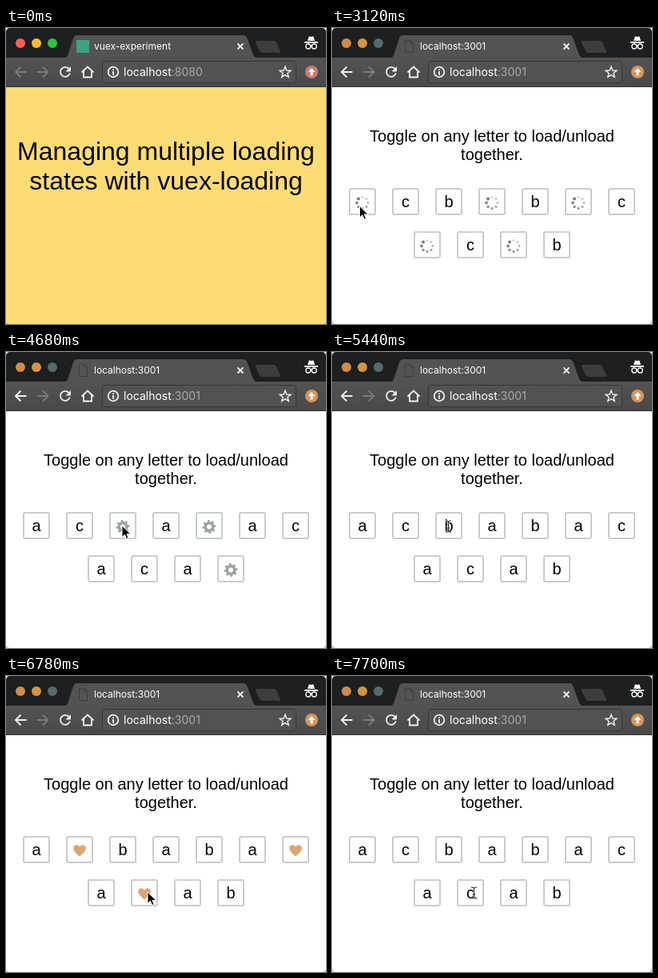
Write an HTML page that moves like this. It is 400x370 px and loops after 8.56 s.

```html
<!DOCTYPE html>
<html lang="en">
<head>
<meta charset="utf-8">
<title>Loading states</title>
<style>
html, body { margin: 0; width: 100%; height: 100%; overflow: hidden; background: #fff; }
svg { display: block; width: 100%; height: 100%; }
text { white-space: pre; }
.ui { font-family: Inter, Roboto, sans-serif; fill: #fff; }
.page { font-family: "Liberation Sans", Arial, sans-serif; fill: #000; text-anchor: middle; }
.line { fill: none; stroke: #f0f0f0; stroke-width: 1.8; }
</style>
</head>
<body>
<svg viewBox="0 0 400 370">
  <defs>
    <clipPath id="frame"><rect width="400" height="370" rx="5"/></clipPath>
    <linearGradient id="bar" x2="0" y2="1">
      <stop stop-color="#535353"/><stop offset="1" stop-color="#494949"/>
    </linearGradient>
  </defs>
  <rect y="360" width="400" height="10" fill="#c4c4c4"/>
  <g clip-path="url(#frame)">
    <rect id="paper" width="400" height="370"/>
    <rect width="400" height="38" fill="#1d1f20"/>
    <rect y="37" width="400" height="36" fill="url(#bar)"/>
    <rect y="73" width="400" height="1" fill="#333"/>
    <path d="M72 37.5C77 37 77 34 78.500 30L84 13Q85.500 9 89 9H296Q300 9 301.500 13L308 31Q310 37 314 37.500Z" fill="#535353"/>
    <path d="M313 16H334Q337 16 338 18L343 29Q344 31 341 31H321Q318 31 317 29L312 18Q311.500 16 313 16Z" fill="#3d3d3d"/>
    <g id="lights"></g>

    <rect id="favicon" x="88" y="15" width="16" height="16" fill="#3f9f83"/>
    <path id="doc" d="M91.500 15.500H98L101.500 19V30.500H91.500ZM98 15.500V19H101.500" fill="none" stroke="#3c3c3c"/>
    <text id="tab" class="ui" x="110" y="27" font-size="12"></text>
    <path class="line" d="M289.500 19.500L296.500 26.500M296.500 19.500L289.500 26.500" stroke-width="1.5"/>

    <g fill="#fff">
      <path d="M377 16L378.500 11Q379 10 381.500 11Q384 10 384.500 11L386 16Z"/>
      <rect x="373" y="17" width="17" height="1.800"/>
      <path d="M374.800 23a3 3 0 1 0 6 0a3 3 0 1 0 -6 0M382.200 23a3 3 0 1 0 6 0a3 3 0 1 0 -6 0M380.500 22.500Q381.500 21.500 382.500 22.500" fill="none" stroke="#fff" stroke-width="1.300"/>
    </g>

    <path id="back" class="line" d="M25.500 55H12M18.500 48.500L12 55L18.500 61.500"/>
    <path class="line" d="M39 55H52.500M46 48.500L52.500 55L46 61.500" style="stroke:#7b7b7b"/>
    <path class="line" d="M78.600 51A6 6 0 1 0 79.800 56.500"/>
    <path d="M81 48V54.500H74.500Z" fill="#f0f0f0"/>
    <path class="line" d="M94.500 55.500L102 48.500L109.500 55.500M97 54V61.500H107V54"/>
    <rect x="120.500" y="41.500" width="242" height="27" rx="3" fill="#525252" stroke="#363636"/>
    <circle class="line" cx="134" cy="55" r="6.300" stroke-width="1.500"/>
    <path d="M133.200 51.200h1.700v1.700h-1.700zM133.200 54h1.700v4.700h-1.700z" fill="#fff"/>
    <text class="ui" x="147" y="60" font-size="14">localhost<tspan id="port" fill="#a9a9a9"></tspan></text>
    <path id="star" class="line" style="stroke-width:1.4"/>
    <circle id="badge" cx="382" cy="55" r="8"/>
    <path d="M382 50L386.500 55H383.500V59.500H380.500V55H377.500Z" fill="#fff"/>

    <g id="intro" class="page" font-size="32">
      <text x="200" y="164.500">Managing multiple loading</text>
      <text x="200" y="201.500">states with vuex-loading</text>
    </g>
    <g id="demo" class="page" font-size="20">
      <text x="200" y="142">Toggle on any letter to load/unload</text>
      <text x="200" y="165">together.</text>
      <g id="keys"></g>
      <path id="arrow" d="M0 0V14.500L3.400 11.300L5.700 16.500L8.100 15.400L5.900 10.400H10.700Z" fill="#000" stroke="#fff" stroke-width="1"/>
      <g id="beam" fill="none">
        <path d="M-3.500 -7Q0 -7 0 -5Q0 -7 3.500 -7M0 -5V5M-3.500 7Q0 7 0 5Q0 7 3.500 7M-2 2H2" stroke="#fff" stroke-width="2.600" opacity=".7"/>
        <path d="M-3.500 -7Q0 -7 0 -5Q0 -7 3.500 -7M0 -5V5M-3.500 7Q0 7 0 5Q0 7 3.500 7M-2 2H2" stroke="#222" stroke-width="1.100"/>
      </g>
    </g>
  </g>
</svg>
<script>
const LOOP = 8560, START = 1960, TAU = Math.PI * 2;
const $ = id => document.getElementById(id);
const make = (tag, attrs, parent) => {
  const el = document.createElementNS('http://www.w3.org/2000/svg', tag);
  set(el, attrs);
  parent.append(el);
  return el;
};
function set(el, attrs) {
  for (const k in attrs) el.setAttribute(k, attrs[k]);
}
const show = (el, on) => { el.style.display = on ? '' : 'none'; };
const polar = (r, a) => [r * Math.sin(a), -r * Math.cos(a)];
const ring = (n, radius) => 'M' + Array.from({ length: n }, (_, i) =>
  polar(radius(i), i * TAU / n).map(v => v.toFixed(2)).join(' ')).join('L') + 'Z';

set($('star'), { d: ring(10, i => i % 2 ? 3.1 : 7.2), transform: 'translate(349 55.500)' });
const lights = [18, 38, 58].map(cx => make('circle', { cx, cy: 19, r: 6 }, $('lights')));

// Each letter has its own loader and its own busy time.
const busy = { a: [2540, 3640], b: [4500, 5440], c: [6420, 7700] };
const HEART = 'M0 7.500C-2 5 -8 1.500 -8 -3C-8 -8.500 -1.500 -8.500 0 -4.500C1.500 -8.500 8 -8.500 8 -3C8 1.500 2 5 0 7.500Z';
const GEAR = ring(32, i => i % 4 < 2 ? 8.6 : 6.4) + 'M-3 0a3 3 0 1 0 6 0a3 3 0 1 0 -6 0Z';

const loaders = {
  a(g) {
    const dots = Array.from({ length: 8 }, (_, i) => {
      const [cx, cy] = polar(7, i * TAU / 8);
      return make('circle', { cx, cy }, g);
    });
    return t => {
      const head = 7 + (t - 3120) / 125;
      dots.forEach((dot, i) => {
        const age = (((head - i) % 8) + 8) % 8 / 8;
        const grey = 125 + 90 * age;
        set(dot, { r: 2 - 0.8 * age, fill: `rgb(${grey},${grey},${grey})` });
      });
    };
  },
  b(g) {
    const gear = make('path', { d: GEAR, fill: '#9aa3a3', 'fill-rule': 'evenodd' }, g);
    return t => set(gear, { transform: `rotate(${(t - busy.b[0]) * 0.18})` });
  },
  c(g) {
    const heart = make('path', { d: HEART, fill: '#dca672' }, g);
    return t => set(heart, { transform: `scale(${1.04 + 0.1 * Math.cos((t - busy.c[0]) / 1000 * TAU)})` });
  }
};

const keys = [];
function addRow(letters, x0, y) {
  [...letters].forEach((name, i) => {
    const x = x0 + 54 * i;
    make('rect', { x: x - 16, y: y - 16, width: 32, height: 32, rx: 2, fill: '#fff', stroke: '#ccc', 'stroke-width': 2 }, $('keys'));
    const label = make('text', { x, y: y + 7 }, $('keys'));
    label.textContent = name;
    const icon = make('g', { transform: `translate(${x} ${y + 1.5})` }, $('keys'));
    keys.push({ name, x, y, label, icon, spin: loaders[name](icon) });
  });
}
addRow('acbabac', 38, 217);
addRow('acab', 119, 271);

const moves = [
  [3940, 4360, [35, 223.5], [145.5, 218]],
  [5680, 6020, [145.5, 218], [177.5, 271]]
];
function pointer(t) {
  let pos = moves[0][2];
  for (const [from, to, p, q] of moves) {
    if (t < from) break;
    const k = Math.min(1, (t - from) / (to - from));
    const e = k * k * (3 - 2 * k);
    pos = p.map((v, i) => v + (q[i] - v) * e);
  }
  return pos;
}
const isBusy = (name, t) => t >= busy[name][0] && t < busy[name][1];

function chrome(intro) {
  const colors = intro ? ['#ff5f57', '#ffbd2e', '#28c940'] : ['#d08c48', '#d6953f', '#546b6a'];
  lights.forEach((el, i) => set(el, { fill: colors[i] }));
  set($('paper'), { fill: intro ? '#fedc75' : '#fff' });
  set($('badge'), { fill: intro ? '#cb7c74' : '#d3965f' });
  $('back').style.stroke = intro ? '#7b7b7b' : '#f0f0f0';
  $('tab').textContent = intro ? 'vuex-experiment' : 'localhost:3001';
  $('port').textContent = intro ? ':8080' : ':3001';
  for (const id of ['favicon', 'intro']) show($(id), intro);
  for (const id of ['doc', 'demo']) show($(id), !intro);
}

let wasIntro = null;
function draw(t) {
  const intro = t < START;
  if (intro !== wasIntro) chrome(wasIntro = intro);
  if (intro) return;
  const [px, py] = pointer(t);
  let overText = false;
  for (const key of keys) {
    const on = isBusy(key.name, t);
    show(key.label, !on);
    show(key.icon, on);
    if (on) key.spin(t);
    else if (Math.abs(px - key.x) < 6 && Math.abs(py - key.y) < 12) overText = true;
  }
  show($('beam'), overText);
  show($('arrow'), !overText);
  set($('beam'), { transform: `translate(${px} ${py})` });
  set($('arrow'), { transform: `translate(${px - 0.5} ${py - 1})` });
}

const origin = performance.now();
function tick() {
  draw((performance.now() - origin) % LOOP);
  requestAnimationFrame(tick);
}
tick();
</script>
</body>
</html>
```
